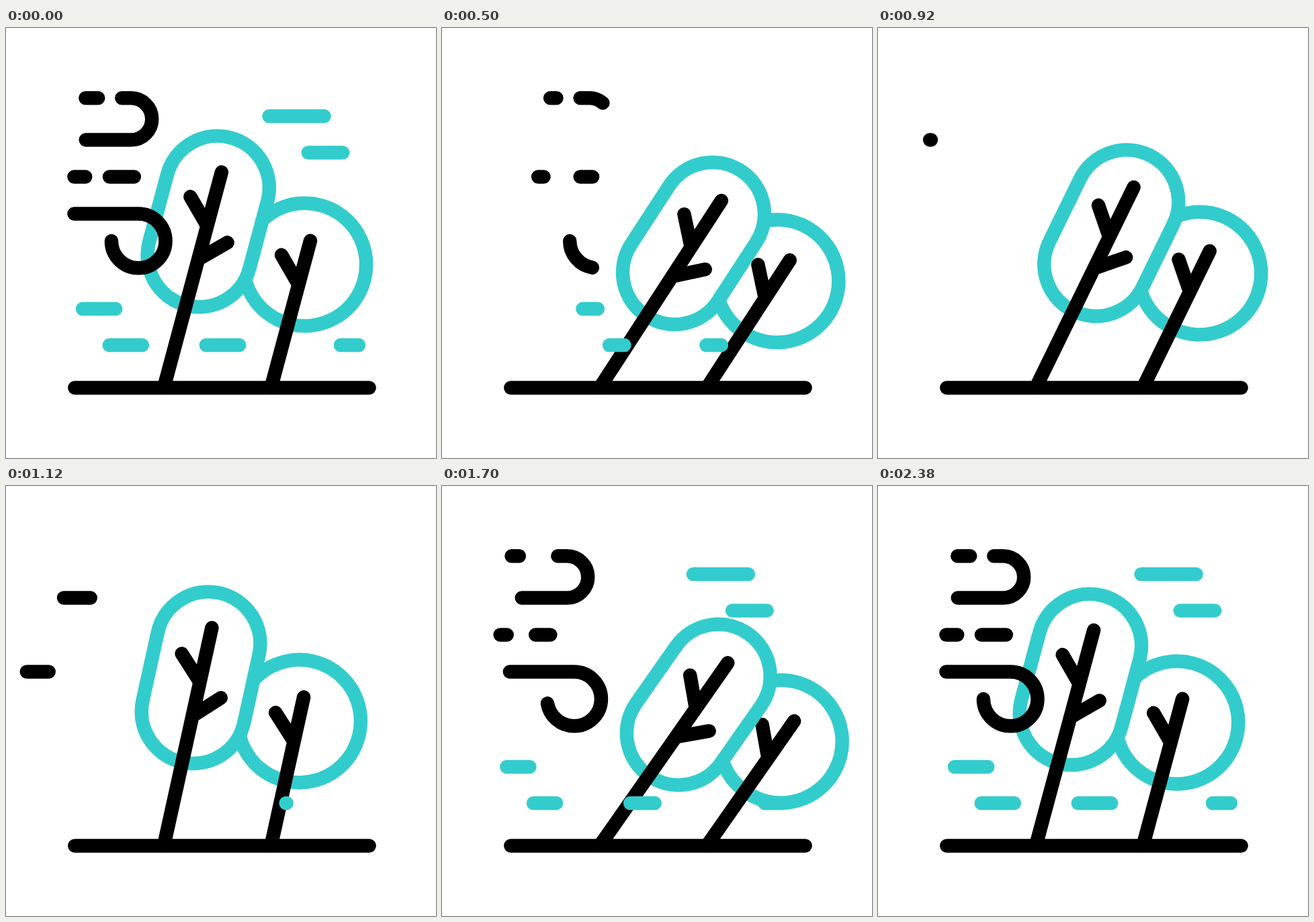
An HTML page for the animation above (2400 ms loop, 640x640 px).

```html
<!DOCTYPE html>
<html lang="en">
<head>
<meta charset="utf-8">
<title>Windy trees</title>
<style>
  html, body { margin: 0; width: 100%; height: 100%; overflow: hidden; background: #fff; }
  svg { display: block; width: 100vw; height: 100vh; }
  path, rect, circle { fill: none; stroke: #000; stroke-width: 20.5; stroke-linecap: round; stroke-linejoin: round; }
  .leaf { stroke: #33cccc; }
  .solid { fill: #fff; }
</style>
</head>
<body>
<svg viewBox="0 0 640 640">
  <path d="M102.3 535.4H540.6"/>
  <g id="small">
    <circle class="leaf" cx="1.2" cy="-189.7" r="91.4"/>
    <path d="M0 0V-226M-36 -194.5L0 -158.5"/>
  </g>
  <g id="tall">
    <rect class="leaf solid" x="-77.2" y="-384.8" width="154.4" height="258" rx="77.2"/>
    <path d="M0 0V-331.7M-35.4 -284.5L0 -249M35.5 -232.8L0 -197.3"/>
  </g>
  <g id="wind"></g>
</svg>
<script>
const LOOP = 2400, TICK = 20;
const byId = id => document.getElementById(id);

// Smooth progress from 0 to 1 between two ticks
function ease(n, from, to) {
  const x = Math.min(1, Math.max(0, (n - from) / (to - from)));
  return x * x * (3 - 2 * x);
}

// Sway of both trees: [tick, degrees]
const sway = [[0, 15], [35, 37.5], [59, 11.3], [86, 35.1], [120, 15]];

function angle(n) {
  let i = 0;
  while (i < sway.length - 2 && n >= sway[i + 1][0]) i++;
  const [t0, a0] = sway[i], [t1, a1] = sway[i + 1];
  return a0 + (a1 - a0) * ease(n, t0, t1);
}

const gusts = [];

// leave/enter: travel in px; the *Move and *Trim pairs are tick ranges
function gust(d, style, outTrim, inTrim) {
  const el = document.createElementNS("http://www.w3.org/2000/svg", "path");
  el.setAttribute("d", d);
  el.setAttribute("pathLength", 1);
  if (style.leaf) el.setAttribute("class", "leaf");
  byId("wind").append(el);
  gusts.push({ el, ...style, outTrim, inTrim });
}

const upper = { leave: 41.5, outMove: [0, 35], enter: 42, inMove: [43.6, 84.3] };
const lower = { leave: 41.5, outMove: [0, 35], enter: 83, inMove: [46, 87] };
const dash = { leave: 41.5, outMove: [0, 35], enter: 83, inMove: [47, 99] };
const leaf = { leaf: true, leave: 83, outMove: [0, 34], enter: 83, inMove: [52, 99] };
const line = (x0, x1, y) => `M${x0} ${y}H${x1}`;

gust("M118.7 166.5H186.1A31.1 31.1 0 0 0 186.1 104.3H172.3", upper, [0, 35], [43.6, 84.3]);
gust("M101.4 276.6H197.2A40.3 40.3 0 1 1 156.9 316.9", lower, [0, 35], [47.2, 88.8]);
gust(line(118.3, 137.2, 104.3), dash, [15, 35], [60, 104]);
gust(line(101.4, 118.2, 221.6), dash, [15, 35], [60, 104]);
gust(line(154, 190.8, 221.6), dash, [15, 35], [60, 104]);

gust(line(391.6, 473.6, 131.2), leaf, [0, 15], [56, 72]);
gust(line(449.8, 501.2, 185.4), leaf, [0, 15], [66, 84]);
gust(line(497.9, 524.9, 472), leaf, [0, 15], [54, 71]);
gust(line(297.8, 347.2, 472), leaf, [16, 33], [73, 91]);
gust(line(153.7, 202.8, 472), leaf, [16, 33], [73, 92]);
gust(line(114, 163.2, 418), leaf, [16, 33], [73, 92]);

function drawGust(g, n) {
  const leaving = n < 40;
  const shift = leaving ? g.leave * ease(n, ...g.outMove)
                        : -g.enter * (1 - ease(n, ...g.inMove));
  const start = leaving ? ease(n, ...g.outTrim) : 0;
  const end = leaving ? 1 : ease(n, ...g.inTrim);
  const size = end - start;
  g.el.style.display = size > 0.001 ? "" : "none";
  g.el.setAttribute("transform", `translate(${shift.toFixed(2)} 0)`);
  g.el.setAttribute("stroke-dasharray", size < 1 ? `${size} 2` : "none");
  g.el.setAttribute("stroke-dashoffset", -start);
}

function draw(ms) {
  const n = (ms % LOOP) / TICK;
  const a = angle(n).toFixed(3);
  byId("tall").setAttribute("transform", `translate(235 535) rotate(${a})`);
  byId("small").setAttribute("transform", `translate(394.5 535) rotate(${a})`);
  for (const g of gusts) drawGust(g, n);
}

let began;
function loop(now) {
  began ??= now;
  draw(now - began);
  requestAnimationFrame(loop);
}
draw(0);
requestAnimationFrame(loop);
</script>
</body>
</html>
```
